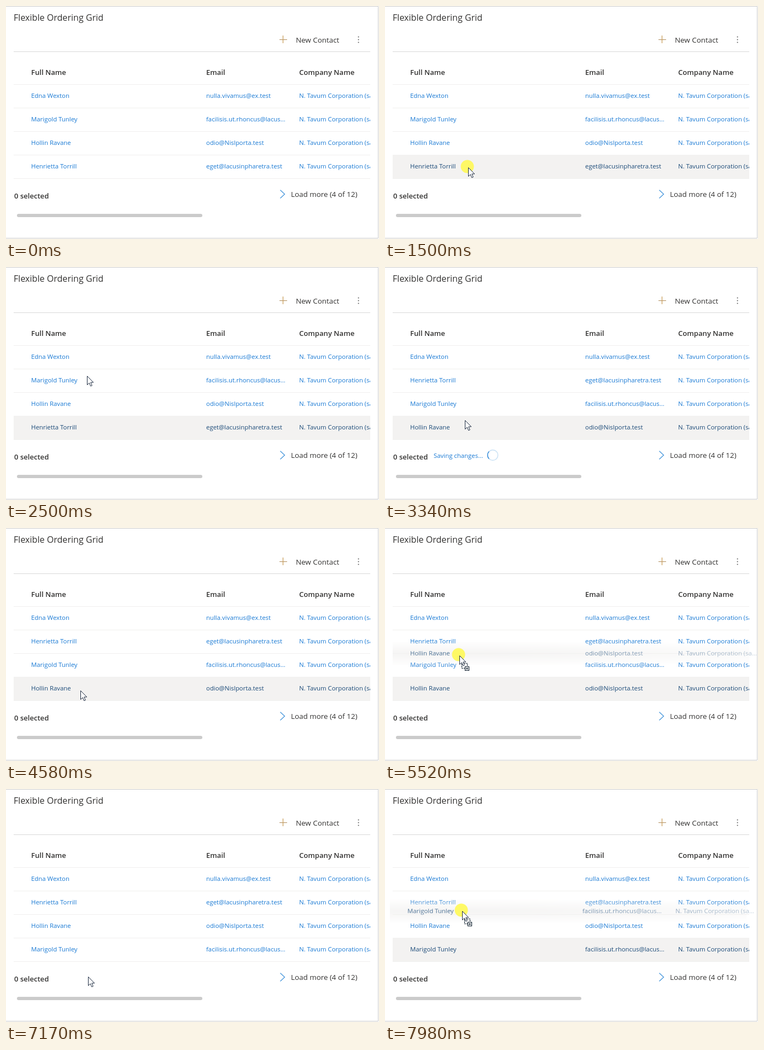
Recreate the animation shown at these times as an HTML page. Size 682 by 426 pixels, loop 8000 ms.

```html
<!DOCTYPE html>
<html lang="en">
<head>
<meta charset="utf-8">
<title>Flexible Ordering Grid</title>
<style>
  html, body { margin: 0; width: 100%; height: 100%; overflow: hidden; background: #fff; }
  svg { display: block; font: 13.4px "Open Sans", "Noto Sans", sans-serif; fill: #323130; }
  .title { font-size: 16.1px; }
  .bold { font-size: 13.1px; font-weight: 600; }
  .row, .small { font-size: 11.4px; fill: #1a7ad4; }
  .row rect { fill: none; }
  .row.hover { fill: #1b4a78; }
  .row.hover rect { fill: #f3f2f1; }
</style>
</head>
<body>
<svg width="682" height="426" viewBox="0 0 682 426">
  <defs>
    <clipPath id="gridClip"><path d="M14 84H666V330H14z"/></clipPath>
    <radialGradient id="fade" cx="0" cy="0" r="1" gradientTransform="translate(.18 .5) scale(1.3 .55)">
      <stop offset="0" stop-color="#fff" stop-opacity=".85"/>
      <stop offset="1" stop-color="#fff" stop-opacity="0"/>
    </radialGradient>
    <mask id="ghostMask" maskContentUnits="objectBoundingBox" x="0" y="0" width="1" height="1">
      <rect width="1" height="1" fill="url(#fade)"/>
    </mask>
  </defs>

  <path d="M0 .5H680.5V424.5H0" fill="none" stroke="#cbcbcb"/>
  <text class="title" x="14" y="27">Flexible Ordering Grid</text>
  <path d="M500 61.5H514" stroke="#b08d5c"/>
  <path d="M506.500 54V68" stroke="#c79a55" stroke-width="1.2"/>
  <text x="530" y="67">New Contact</text>
  <g fill="#555"><circle cx="644.5" cy="56.5" r="1"/><circle cx="644.5" cy="61.5" r="1"/><circle cx="644.5" cy="66.5" r="1"/></g>
  <path d="M14 83.5H666" stroke="#d8d8d8"/>
  <g class="bold">
    <text x="46" y="126">Full Name</text>
    <text x="366" y="126">Email</text>
    <text x="536" y="126">Company Name</text>
    <text x="15" y="352">0 selected</text>
  </g>
  <path d="M14 143.5H666M14 186.5H666M14 229.5H666M14 272.5H666M14 315.5H666" stroke="#f0efee"/>
  <g id="grid" clip-path="url(#gridClip)"></g>

  <path d="M501.500 336.500L509.500 344L501.500 351.500" fill="none" stroke="#3a8fd9" stroke-width="1.2"/>
  <text x="521" y="349">Load more (4 of 12)</text>
  <rect x="20" y="380" width="339" height="6" rx="3" fill="#cbcbcb"/>

  <g id="saving">
    <text class="small" x="89" y="349">Saving changes...</text>
    <g fill="none" stroke-width="1.4">
      <circle cx="197" cy="344" r="9.500" stroke="#c7e0f4"/>
      <path id="spinner" d="M190.280 337.280A9.500 9.500 0 0 1 203.720 337.280" stroke="#2a86d8"/>
    </g>
  </g>

  <g id="ghost" mask="url(#ghostMask)"><use id="ghostRow"/></g>
  <g id="pointer">
    <circle id="press" cx="-1.500" cy="-1.500" r="12" fill="#fff94c" opacity=".85"/>
    <path d="M.5 .5V16.500L4.200 13L6.800 18.800L9.300 17.700L6.800 12H11.800z" fill="#fff" stroke="#1c2a40"/>
    <g id="dropIcon" fill="none" stroke="#10202f" stroke-width="1.2">
      <path d="M4.500 15V23.500H10M8 14.500H14.500V20" stroke-dasharray="3 1"/>
      <path d="M10.500 20.500H17.500V27.500H10.500z" fill="#fff"/>
      <path d="M12 24H16M14 22V26"/>
    </g>
  </g>
</svg>
<script>
const LOOP = 8000, ROW_TOP = 143, ROW_HEIGHT = 43;
const $ = id => document.getElementById(id);

const contacts = [
  ['Edna Wexton', 'nulla.vivamus@ex.test'],
  ['Marigold Tunley', 'facilisis.ut.rhoncus@lacus...'],
  ['Hollin Ravane', 'odio@Nislporta.test'],
  ['Henrietta Torrill', 'eget@lacusinpharetra.test'],
];
$('grid').innerHTML = contacts.map(([name, email], i) => `
  <g class="row" id="row${i}">
    <rect x="14" y="143" width="652" height="43"/>
    <text x="46" y="168">${name}</text>
    <text x="366" y="168">${email}</text>
    <text x="536" y="168">N. Tavum Corporation (sa...</text>
  </g>`).join('');

// Pointer moves: first step, last step, number of steps, end x, end y
const start = [150, 440];
const moves = [
  [70, 830, 12, 152, 295],
  [1570, 2230, 11, 148, 199],
  [2990, 3620, 10, 145, 324],
  [4100, 4580, 7, 136, 297],
  [4920, 5320, 6, 136, 233],
  [5720, 6280, 9, 148, 357],
  [6770, 7100, 5, 150, 348],
  [7170, 7170, 1, 150, 343],
  [7240, 7310, 2, 146, 293],
  [7580, 7980, 6, 141, 223],
];
// Drags: press, release, dragged contact
const drags = [[1500, 2500, 3], [4850, 5650, 2], [7510, 8100, 1]];
const saves = [[2640, 3480], [5790, 7030]];

const within = (t, [from, to]) => t >= from && t < to;
const show = (id, on) => $(id).style.display = on ? '' : 'none';
const smooth = p => p * p * (3 - 2 * p);

function pointerAt(t) {
  let [x, y] = start;
  for (const [from, to, steps, endX, endY] of moves) {
    if (t < from) break;
    const step = (to - from) / (steps - 1) || 1;
    const p = smooth(Math.min(1, (Math.floor((t - from) / step + 1e-6) + 1) / steps));
    x += (endX - x) * p;
    y += (endY - y) * p;
  }
  return [x, y];
}

function orderAt(t) {
  if (t < 2570) return [0, 1, 2, 3];
  return t < 5720 ? [0, 3, 1, 2] : [0, 3, 2, 1];
}

function draw(t) {
  const [x, y] = pointerAt(t);
  const drag = drags.find(d => within(t, d));
  const dragging = drag && t >= drag[0] + 70;
  const settling = drags.some(([from, to]) => within(t, [from, to + 70]));
  const hovered = settling ? 3 : Math.floor((y - ROW_TOP) / ROW_HEIGHT);

  orderAt(t).forEach((contact, slot) => {
    const row = $('row' + contact);
    row.setAttribute('transform', `translate(0 ${slot * ROW_HEIGHT})`);
    row.classList.toggle('hover', slot === hovered);
  });

  show('pointer', t >= 70);
  show('press', drag);
  show('dropIcon', dragging);
  show('ghost', dragging);
  $('pointer').setAttribute('transform', `translate(${Math.round(x)} ${Math.round(y)})`);
  if (dragging) {
    const [grabX, grabY] = pointerAt(drag[0]);
    $('ghostRow').setAttribute('href', '#row' + drag[2]);
    $('ghostRow').setAttribute('transform', `translate(${Math.round(x - grabX)} ${Math.round(y - grabY)})`);
  }

  show('saving', saves.some(s => within(t, s)));
  $('spinner').setAttribute('transform', `rotate(${(t - 2365) / 1300 * 360} 197 344)`);
}

function frame() {
  draw(performance.now() % LOOP);
  requestAnimationFrame(frame);
}
frame();
</script>
</body>
</html>
```
